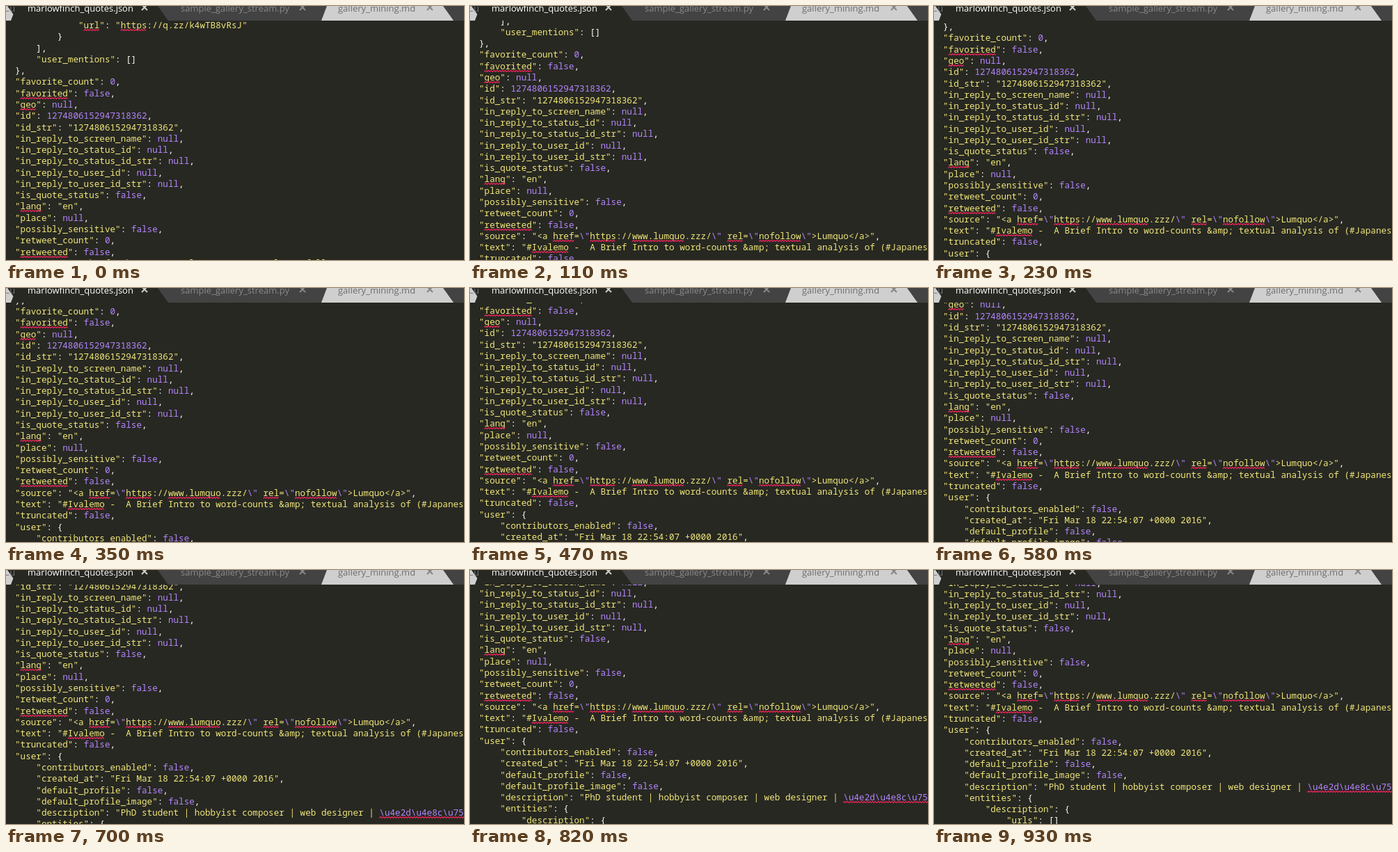
Write an HTML page with a canvas that moves like this. It is 658 px wide and 365 px high and loops after 1050 ms.

```html
<!DOCTYPE html>
<html lang="en">
<head>
<meta charset="utf-8">
<title>Scrolling JSON</title>
<style>
html, body { margin: 0; width: 100%; height: 100%; overflow: hidden; background: #272822; }
canvas { display: block; }
</style>
</head>
<body>
<canvas id="stage" width="658" height="365"></canvas>
<script>
const ctx = document.getElementById('stage').getContext('2d');
const BG = '#272822', YELLOW = '#f0e67a', PURPLE = '#b485ff', WHITE = '#ffffff', RED = '#f0245c';
const CODE_FONT = '500 12.65px "Noto Sans Mono", "DejaVu Sans Mono", monospace';
const TAB_FONT = '13px "Open Sans", "Noto Sans", sans-serif';
const LEFT = 13, FIRST_BASELINE = 32, LINE = 16.28, BAR = 21, LOOP = 1050;

// [start in ms, scroll in px]
const steps = [[0, 0], [110, 39], [230, 63], [350, 75.2], [460, 93], [580, 117.5], [700, 151], [820, 173], [930, 188.5]];

const lines = String.raw`            "url": "https://q.zz/k4wTB8vRsJ"
        }
    ],
    "user_mentions": []
},
"favorite_count": 0,
"favorited": false,
"geo": null,
"id": 1274806152947318362,
"id_str": "1274806152947318362",
"in_reply_to_screen_name": null,
"in_reply_to_status_id": null,
"in_reply_to_status_id_str": null,
"in_reply_to_user_id": null,
"in_reply_to_user_id_str": null,
"is_quote_status": false,
"lang": "en",
"place": null,
"possibly_sensitive": false,
"retweet_count": 0,
"retweeted": false,
"source": "<a href=\"https://www.lumquo.zzz/\" rel=\"nofollow\">Lumquo</a>",
"text": "#Ivalemo -  A Brief Intro to word-counts &amp; textual analysis of (#Japanese
"truncated": false,
"user": {
    "contributors_enabled": false,
    "created_at": "Fri Mar 18 22:54:07 +0000 2016",
    "default_profile": false,
    "default_profile_image": false,
    "description": "PhD student | hobbyist composer | web designer | \u4e2d\u4e8c\u75c5
    "entities": {
        "description": {
            "urls": []`.split('\n');

const misspelled = /\b(?:favorited|geo|lang|retweeted|https|www\.lumquo|href|rel|nofollow|Ivalemo|urls?)\b|\\u4.*/g;
const stringToken = /"(?:\\.|[^"\\])*"?/g;
const purpleToken = /\\(?:u\w{4}|.)|\b(?:null|false)\b|\b\d+\b/g;

// Colour of every character, then grouped into runs of one colour
function colourRuns(line) {
  const colours = Array(line.length).fill(WHITE);
  const paint = (match, colour) => colours.fill(colour, match.index, match.index + match[0].length);
  const strings = [...line.matchAll(stringToken)];
  const inString = i => strings.some(s => i >= s.index && i < s.index + s[0].length);
  strings.forEach(s => paint(s, YELLOW));
  for (const m of line.matchAll(purpleToken)) {
    if (m[0][0] === '\\' || !inString(m.index)) paint(m, PURPLE);
  }
  const runs = [];
  colours.forEach((colour, col) => {
    const last = runs[runs.length - 1];
    if (last && last.colour === colour) last.text += line[col];
    else runs.push({ col, colour, text: line[col] });
  });
  return runs;
}

const rows = lines.map(line => ({ runs: colourRuns(line), marks: [...line.matchAll(misspelled)] }));

function squiggle(x, y, width) {
  ctx.beginPath();
  for (let d = 0; d <= width; d += 2) ctx.lineTo(x + d, y + (d % 4 ? -1 : 1));
  ctx.strokeStyle = RED;
  ctx.lineWidth = 1.2;
  ctx.stroke();
}

function drawCode(scroll) {
  ctx.font = CODE_FONT;
  const charWidth = ctx.measureText('0').width;
  rows.forEach(({ runs, marks }, i) => {
    const y = Math.round(FIRST_BASELINE + i * LINE - scroll);
    if (y < 10 || y > 380) return;
    for (const { col, colour, text } of runs) {
      ctx.fillStyle = colour;
      ctx.fillText(text, LEFT + col * charWidth, y);
    }
    for (const m of marks) squiggle(LEFT + m.index * charWidth, y + 2.5, m[0].length * charWidth);
  });
}

// Tab with edges that slope outwards towards the bottom
function tab(left, right, colour) {
  ctx.fillStyle = colour;
  ctx.beginPath();
  ctx.moveTo(left, 0);
  ctx.lineTo(left - 8, BAR);
  ctx.lineTo(right + 15, BAR);
  ctx.lineTo(right, 0);
  ctx.fill();
}

function label(text, x, closeX, colour, closeColour) {
  ctx.fillStyle = colour;
  ctx.fillText(text, x, 7.5);
  ctx.strokeStyle = closeColour;
  ctx.lineWidth = 2;
  ctx.beginPath();
  for (const s of [-1, 1]) {
    ctx.moveTo(closeX - 4, 2 - 4 * s);
    ctx.lineTo(closeX + 4, 2 + 4 * s);
  }
  ctx.stroke();
}

function drawTabs() {
  ctx.fillStyle = BG;
  ctx.fillRect(0, 0, 658, BAR);
  ctx.fillStyle = '#434343';
  ctx.fillRect(200, 0, 458, BAR);
  tab(-20, 2, '#cfcfcf');
  tab(461, 628, '#cfcfcf');
  ctx.font = TAB_FONT;
  ctx.fillStyle = '#777';
  ctx.fillText('Cu', -3, 7.5);
  tab(15, 218, BG);
  label('marlowfinch_quotes.json', 31, 199, '#ffffff', '#d0d0d0');
  label('sample_gallery_stream.py', 251, 426, '#8a8a8a', '#8a8a8a');
  label('gallery_mining.md', 477, 609, '#6e6e6e', '#858585');
}

function draw() {
  const time = performance.now() % LOOP;
  const [, scroll] = steps.findLast(([start]) => start <= time);
  ctx.fillStyle = BG;
  ctx.fillRect(0, 0, 658, 365);
  drawCode(scroll);
  drawTabs();
  requestAnimationFrame(draw);
}
draw();
</script>
</body>
</html>
```
